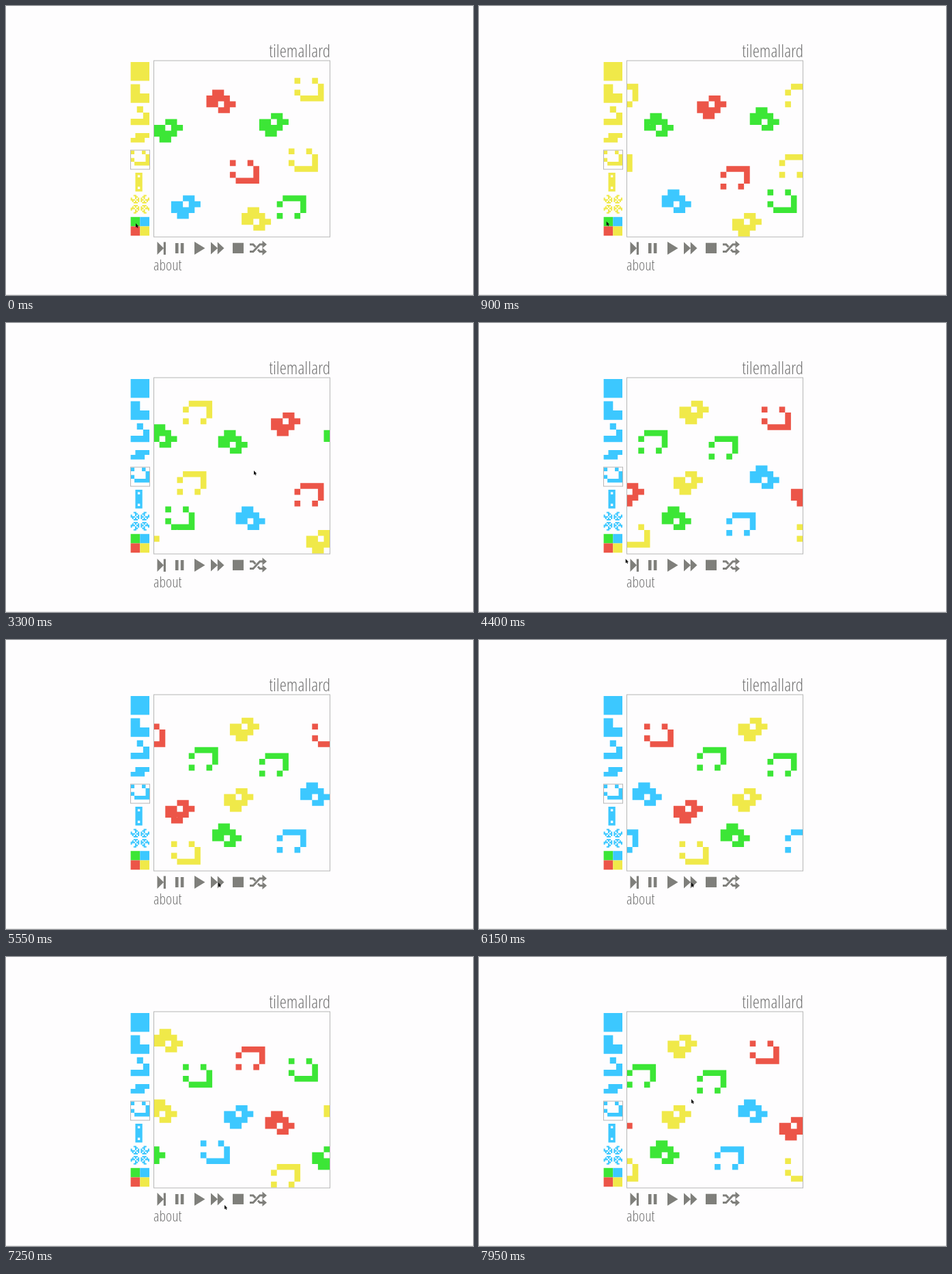
Recreate the animation shown at these times as an HTML page. Size 684 by 423 pixels, loop 8000 ms.

```html
<!DOCTYPE html>
<html lang="en">
<head>
<meta charset="utf-8">
<title>Cellular automaton</title>
<style>
  html, body { margin: 0; width: 100%; height: 100%; overflow: hidden; background: #fefdfe; }
  svg { display: block; width: 684px; height: 423px; }
  text { font-family: "Open Sans Condensed Light", "Open Sans", sans-serif; font-stretch: 75%; font-weight: 300; fill: #757575; }
  .frame { fill: none; stroke: #b6b6b6; }
</style>
</head>
<body>
<svg viewBox="0 0 684 423">
  <rect width="684" height="423" fill="#fefdfe"/>
  <path d="M0 422.5H684" stroke="#e6e6e6"/>
  <text x="475" y="75" font-size="26" text-anchor="end">tilemallard</text>
  <text x="216" y="387" font-size="22">about</text>

  <path id="tools"/>
  <g id="swatches"></g>
  <g id="world"></g>
  <rect class="frame" x="182.5" y="211" width="28" height="28"/>
  <rect class="frame" x="216.5" y="80" width="258" height="258"/>

  <g fill="#7f7f7b">
    <path d="M221.5 345L231 354.5L221.5 364ZM230.8 345.5h3.2v18.5h-3.2Z"/>
    <path d="M248 347h4.6v15h-4.6ZM255.8 347h4.6v15h-4.6Z"/>
    <path d="M276 345L291.5 354.5L276 364Z"/>
    <path d="M300 345.5L310 354.5L300 363.5ZM309.8 345.5L319.5 354.5L309.8 363.5Z"/>
    <path d="M332 346.7h16v15.3h-16Z"/>
    <path d="M375.5 343.5L382 349L375.5 354.5ZM375.5 354L382 359.5L375.5 365Z"/>
    <path d="M357 349h5l3.5 3.8M369 356.5l2.8 3H376M357 359.5h5L371.8 349H376" fill="none" stroke="#7f7f7b" stroke-width="3"/>
  </g>
  <path id="cursor" d="M0 0V6.2L1.4 5L2.4 7L3.5 6.5L2.6 4.5H4.4Z" fill="#111"/>
</svg>

<script>
const LOOP = 8000, TICK = 50, GRID = 30, CELL = 8.6, ORIGIN = [216.1, 79.4];
const STEP = 150, FAST_STEP = 50, FAST_FROM = 5550;
const BLUE_PICKED = 1700, SHIP_ADDED = 3400;
const COLORS = { green: '#3ce636', blue: '#3cc8ff', red: '#ec5548', yellow: '#f0e949' };

const SMILE = ['O..O.', '....O', 'O...O', '.OOOO'];
const BLOB = ['.OO..', 'OOOO.', 'OO.OO', '..OO.'];
const flip = rows => [...rows].reverse();

// One spaceship cycle: four generations, two cells to the right.
const PHASES = [
  { rows: SMILE, dx: 0, dy: 0 },
  { rows: flip(BLOB), dx: 1, dy: 1 },
  { rows: flip(SMILE), dx: 1, dy: 1 },
  { rows: BLOB, dx: 2, dy: 0 }
];

// color, column, row, starting phase, time of appearance
const SHIPS = [
  ['yellow', 24, 3, 0], ['yellow', 23, 15, 0], ['yellow', 13, 25, 3],
  ['red', 13, 17, 0], ['red', 7, 5, 3],
  ['green', 20, 22, 2], ['green', -1, 9, 1], ['green', 17, 8, 1],
  ['blue', 2, 22, 1], ['blue', 5, 15, 2, SHIP_ADDED]
];

// time, x, y
const CURSOR_PATH = [
  [0, 190, 318], [250, 190, 318], [600, 158, 302], [1050, 201, 322], [1500, 207, 316],
  [1900, 207, 316], [2300, 187, 228], [2500, 195, 225], [2750, 230, 230], [3150, 363, 216],
  [3500, 363, 216], [4050, 260, 295], [4200, 212, 325], [4350, 212, 340], [4650, 228, 372],
  [5150, 305, 357], [5550, 311, 355], [6400, 311, 355], [7250, 320, 363],
  [7350, 321, 366], [7950, 311, 208], [8000, 311, 208]
];

const halfPulsar = ['..OO.....OO..', '...OO...OO...', 'O..O.O.O.O..O',
  'OOO.OO.OO.OOO', '.O.O.O.O.O.O.', '..OOO...OOO..'];
const TOOLS = [
  [1, ['O']],
  [2, ['O.', 'OO']],
  [3, ['.O.', '..O', 'OOO']],
  [4, ['', '.OOO', 'OOO.']],
  [5, SMILE],
  [8, ['OOO', 'O.O', 'OOO', 'OOO', 'OOO', 'OOO', 'O.O', 'OOO'].map(r => '..' + r)],
  [13, [...halfPulsar, '', ...flip(halfPulsar)]]
];
const TOOL_SIZE = 27.4, TOOL_X = 182.6, TOOL_Y = 82, TOOL_GAP = 32.4;

const $ = id => document.getElementById(id);
const mod = (n, m) => ((n % m) + m) % m;
const box = (x, y, s) => `M${x.toFixed(2)} ${y.toFixed(2)}h${s}v${s}h${-s}z`;

function svgPath(parent, color) {
  const path = document.createElementNS('http://www.w3.org/2000/svg', 'path');
  path.setAttribute('fill', color);
  return parent.appendChild(path);
}

function eachCell(rows, visit) {
  rows.forEach((row, y) => [...row].forEach((c, x) => c === 'O' && visit(x, y)));
}

function drawTools() {
  let d = '';
  TOOLS.forEach(([count, rows], i) => {
    const size = TOOL_SIZE / count;
    eachCell(rows, (x, y) => {
      d += box(TOOL_X + x * size, TOOL_Y + i * TOOL_GAP + y * size, size);
    });
  });
  $('tools').setAttribute('d', d);

  Object.values(COLORS).forEach((color, i) => {
    const half = TOOL_SIZE / 2, x = TOOL_X + (i % 2) * half;
    const y = TOOL_Y + 7 * TOOL_GAP + (i >> 1) * half;
    svgPath($('swatches'), color).setAttribute('d', box(x, y, half));
  });
}

function generation(t) {
  return t < FAST_FROM
    ? Math.floor(t / STEP)
    : FAST_FROM / STEP + Math.floor((t - FAST_FROM) / FAST_STEP);
}

function shipPath([, column, row, start], gen) {
  const age = start + gen;
  const { rows, dx, dy } = PHASES[age % 4];
  const left = column + dx + 2 * Math.floor(age / 4);
  let d = '';
  eachCell(rows, (x, y) => {
    d += box(ORIGIN[0] + mod(left + x, GRID) * CELL, ORIGIN[1] + mod(row + dy + y, GRID) * CELL, CELL);
  });
  return d;
}

function cursorAt(t) {
  const i = CURSOR_PATH.findIndex(key => key[0] > t);
  const [t0, x0, y0] = CURSOR_PATH[i - 1], [t1, x1, y1] = CURSOR_PATH[i];
  const k = (t - t0) / (t1 - t0);
  return [x0 + (x1 - x0) * k, y0 + (y1 - y0) * k];
}

drawTools();
const shipNodes = SHIPS.map(([color]) => svgPath($('world'), COLORS[color]));

function render(time) {
  const t = Math.floor((time % LOOP) / TICK) * TICK;
  const gen = generation(t);
  SHIPS.forEach((ship, i) => {
    const visible = t >= (ship[4] || 0);
    shipNodes[i].setAttribute('d', visible ? shipPath(ship, gen) : '');
  });
  $('tools').setAttribute('fill', t < BLUE_PICKED ? COLORS.yellow : COLORS.blue);
  $('cursor').setAttribute('transform', `translate(${cursorAt(t)})`);
}

const startTime = performance.now();
function loop() {
  render(performance.now() - startTime);
  requestAnimationFrame(loop);
}
loop();
</script>
</body>
</html>
```
